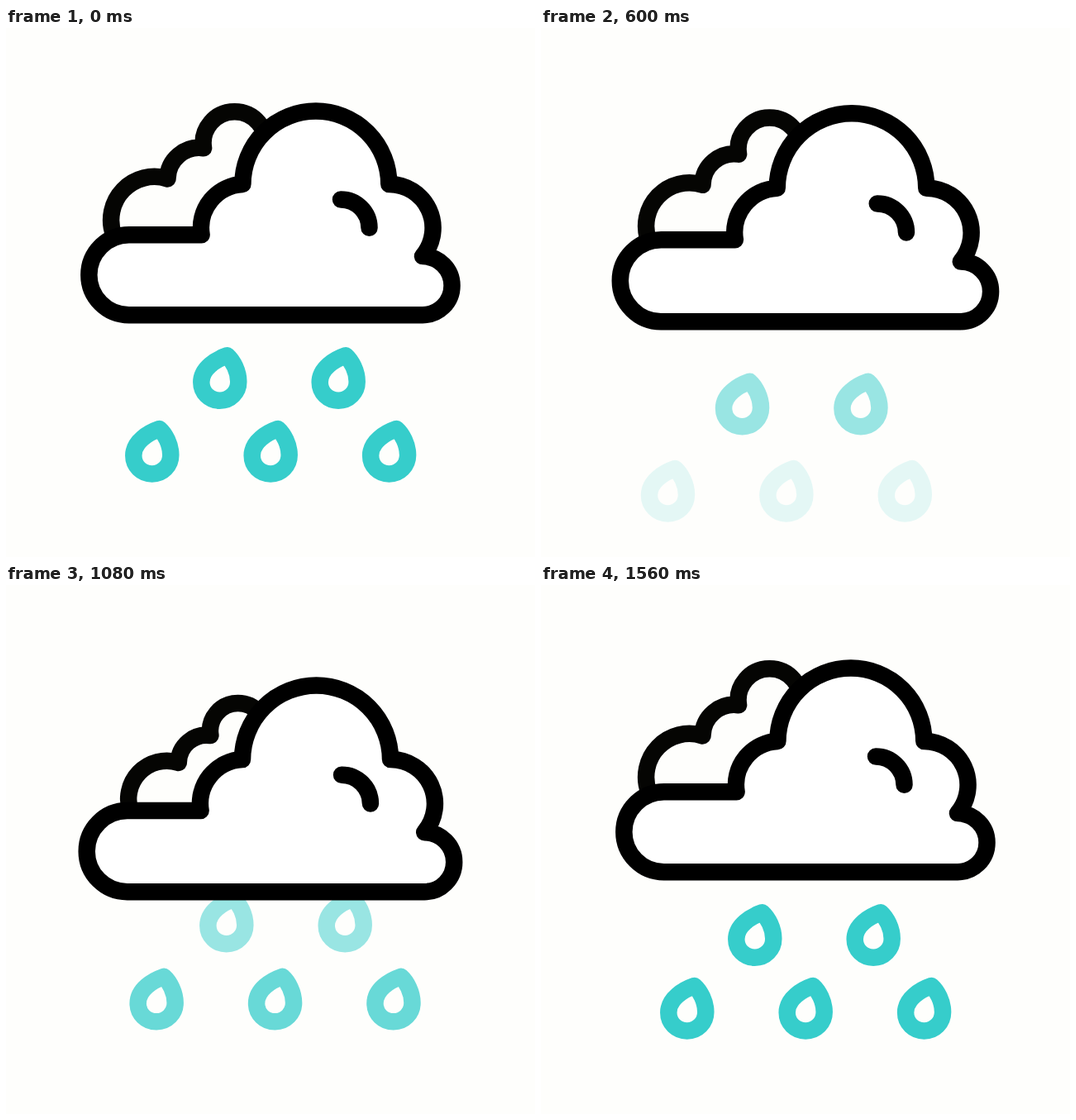
Write an HTML page that moves like this. It is 640 px wide and 640 px high and loops after 1640 ms.

```html
<!DOCTYPE html>
<html lang="en">
<head>
<meta charset="utf-8">
<title>Rain cloud</title>
<style>
  html, body { margin: 0; width: 100%; height: 100%; overflow: hidden; background: #fefefc; }
  svg { display: block; width: 100vw; height: 100vh; }
  path { stroke-linecap: round; stroke-linejoin: round; }
  .line { fill: none; stroke: #000; stroke-width: 20.5; }
  .back { stroke: #050503; }
  .body { fill: #fff; }
  .rain { fill: none; stroke: #36cdcb; stroke-width: 20.5; }
</style>
</head>
<body>
<svg viewBox="0 0 640 640">
  <defs>
    <path id="drop" d="M267.6 396.3C254.5 400.8 236.3 411.5 236.3 428.6C236.3 441 246 450.7 258.7 450.7C271.5 450.7 281.3 440.5 281.3 428C281.3 415 274.5 402.5 267.6 396.3Z"/>
  </defs>
  <g class="rain" id="upper">
    <use href="#drop"/>
    <use href="#drop" x="143.4"/>
  </g>
  <g class="rain" id="lower">
    <use href="#drop" x="-82" y="88.7"/>
    <use href="#drop" x="61.4" y="88.7"/>
    <use href="#drop" x="204.8" y="88.7"/>
  </g>
  <g id="clouds">
    <g id="back">
      <path class="line back" d="M130.3 250.3A52.4 52.4 0 0 1 195.5 182.4A38.1 38.1 0 0 1 239.1 145.3A38 38 0 1 1 314.1 145.3"/>
    </g>
    <g id="front">
      <path class="line body" d="M148.8 347.2A48.45 48.45 0 0 1 148.8 250.3H236.6A53 53 0 0 1 286.4 189A88.45 88.45 0 0 1 463.3 189A52.9 52.9 0 0 1 504 276.1A35.55 35.55 0 0 1 504 347.2Z"/>
      <path class="line" d="M405 207.4A34.5 34.5 0 0 1 439.5 241.8"/>
    </g>
  </g>
</svg>
<script>
  const LOOP = 1640, STEP = 40, STROKE = 20.5;
  const el = id => document.getElementById(id);
  const ramp = (t, a, b) => Math.min(1, Math.max(0, (t - a) / (b - a)));
  const ease = (t, a, b) => { const x = ramp(t, a, b); return x * x * (3 - 2 * x); };
  const pulse = (t, a, peak, b) => t < peak ? ease(t, a, peak) : 1 - ease(t, peak, b);

  // Scale about a point while keeping the line weight
  function zoom(node, s, x, y) {
    node.setAttribute("transform", `translate(${x} ${y}) scale(${s}) translate(${-x} ${-y})`);
    for (const p of node.children) p.style.strokeWidth = STROKE / s;
  }

  // Fall and fade out, then come back in from above
  function rain(node, t, out, back) {
    const leaving = t < 800;
    const y = leaving
      ? 110.5 * ease(t, out.start, out.start + 1150)
      : -back.rise * (1 - ease(t, back.end - 862, back.end));
    const alpha = leaving
      ? 1 - ramp(t, out.fade, out.fade + 320)
      : ramp(t, back.fade, back.fade + 320);
    node.setAttribute("transform", `translate(${-0.485 * y} ${y})`);
    node.setAttribute("opacity", alpha);
  }

  function draw(t) {
    el("clouds").setAttribute("transform", `translate(0 ${31.3 * pulse(t, 436, 956, 1341)})`);
    zoom(el("front"), 1 + 0.08 * pulse(t, 480, 840, 1158), 320, 320);
    zoom(el("back"), 1 - 0.142 * pulse(t, 600, 985, 1318), 312, 260);
    rain(el("lower"), t, { start: 75, fade: 320 }, { rise: 35.6, end: 1400, fade: 840 });
    rain(el("upper"), t, { start: 195, fade: 440 }, { rise: 40.2, end: 1460, fade: 920 });
  }

  const start = performance.now();
  function tick() {
    const t = (performance.now() - start) % LOOP;
    draw(Math.floor(t / STEP) * STEP);
    requestAnimationFrame(tick);
  }
  tick();
</script>
</body>
</html>
```
